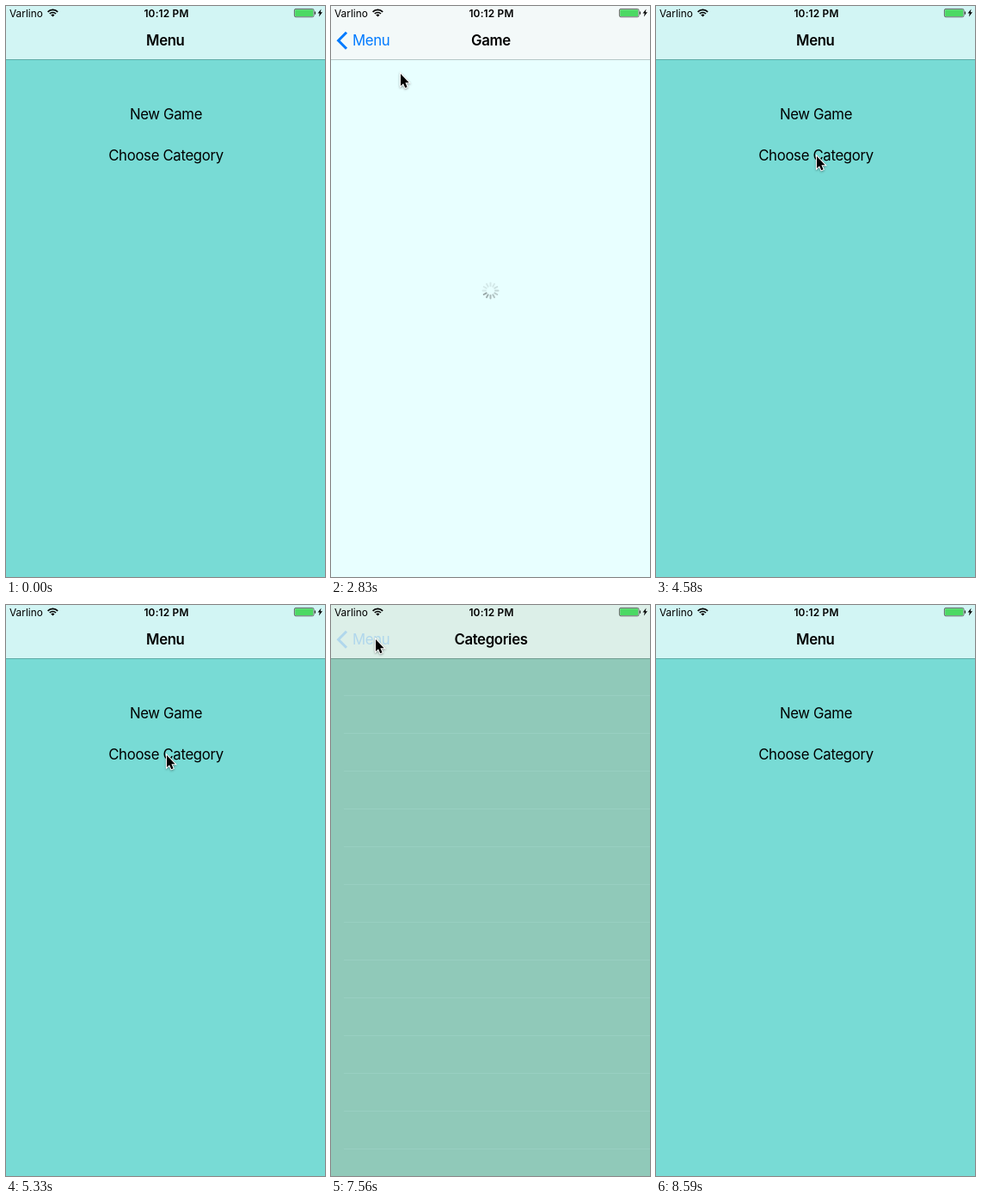
An HTML page with a canvas that plays this animation: 371 px wide and 665 px high, repeating every 9.65 s.

```html
<!DOCTYPE html>
<html lang="en">
<head>
<meta charset="utf-8">
<title>Menu navigation</title>
<style>
html, body { margin: 0; width: 100%; height: 100%; overflow: hidden; }
canvas { display: block; }
</style>
</head>
<body>
<canvas id="stage" width="371" height="665"></canvas>
<script>
const ctx = document.getElementById('stage').getContext('2d');
const W = 371, H = 665, BAR = 62, LOOP = 9650, STEP = 148.1;
const BLUE = '#007aff';

const MENU = { body: '#78dbd5', bar: '#d2f5f4' };
const GAME = { title: 'Game', body: '#e8ffff', bar: '#f3f9f9' };
const CATEGORIES = { title: 'Categories', body: '#90c9b9', bar: '#dcefe8' };

// Screen changes; "at" is the step at which the slide begins
const slides = [
  { at: 14.5, top: GAME, push: true },
  { at: 24.6, top: GAME, push: false },
  { at: 36.5, top: CATEGORIES, push: true },
  { at: 51.6, top: CATEGORIES, push: false }
];

// Pointer keys: step, x, y
const pointer = [
  [3, 228, 70], [4, 196, 96], [5, 172, 118], [6, 162, 127], [7, 166, 127],
  [16, 166, 127], [19, 81, 79], [20, 39, 48], [21, 36, 42], [25, 36, 42],
  [26, 44, 50], [30, 181, 170], [31, 187, 175], [38, 187, 175], [42, 54, 47],
  [43, 52, 40], [52, 52, 40], [53, 72, 38], [57, 350, 110]
];

const clamp = v => Math.max(0, Math.min(1, v));
const spring = s => s <= 0 ? 0 : s > 0.5 ? 1 : 1 - (1 + 18 * s) * Math.exp(-18 * s);

function text(str, x, y, { size = 16.8, weight = 400, color = '#000', align = 'left', alpha = 1, track = -0.35 } = {}) {
  ctx.globalAlpha = alpha;
  ctx.font = `${weight} ${size}px Inter, sans-serif`;
  ctx.letterSpacing = track + 'px';
  ctx.textAlign = align;
  ctx.fillStyle = color;
  ctx.fillText(str, x, y);
  ctx.globalAlpha = 1;
}

function rect(color, x, y, w, h) {
  ctx.fillStyle = color;
  ctx.fillRect(x, y, w, h);
}

function polygon(points) {
  ctx.beginPath();
  points.forEach(([x, y]) => ctx.lineTo(x, y));
  ctx.closePath();
}

function gradient(x0, x1, from, to) {
  const g = ctx.createLinearGradient(x0, 0, x1, 0);
  g.addColorStop(0, from);
  g.addColorStop(1, to);
  return g;
}

function drawMenu(x, step) {
  rect(MENU.body, x, 0, W + 120, H);
  const dim = n => step === n ? 0.2 : 1;
  text('New Game', x + 186, 132, { align: 'center', alpha: dim(13) });
  text('Choose Category', x + 186, 180, { align: 'center', alpha: dim(35) });
}

function drawSpinner(cx, cy, step) {
  const head = 8 + Math.round((step - 19) * 1.777);
  ctx.lineWidth = 2;
  ctx.lineCap = 'round';
  for (let i = 0; i < 12; i++) {
    const age = (((head - i) % 12) + 12) % 12;
    const a = (i / 12) * 2 * Math.PI;
    const sx = Math.sin(a), sy = -Math.cos(a);
    ctx.strokeStyle = `rgba(110,120,120,${0.65 - Math.min(age, 7) * 0.07})`;
    ctx.beginPath();
    ctx.moveTo(cx + sx * 5.6, cy + sy * 5.6);
    ctx.lineTo(cx + sx * 9, cy + sy * 9);
    ctx.stroke();
  }
  ctx.lineCap = 'butt';
}

function drawTop(screen, x, step) {
  rect(screen.body, x, 0, W, H);
  if (screen === CATEGORIES) {
    for (let y = 105; y < H; y += 44) rect('#98cfc1', x + 15, y, W, 1);
  } else if (step < 20) {
    drawSpinner(x + 185.5, 331.5, step);
  }
}

function drawStatus() {
  text('Varlino', 4, 12.5, { size: 11.87, track: 0 });
  text('10:12 PM', 186.5, 12.5, { size: 11.87, weight: 600, align: 'center', track: 0.2 });

  const fan = [-Math.PI * 0.75, -Math.PI * 0.25];
  ctx.strokeStyle = ctx.fillStyle = '#000';
  ctx.lineWidth = 1.7;
  for (const r of [8.2, 5.1]) {
    ctx.beginPath();
    ctx.arc(54.4, 12.6, r, ...fan);
    ctx.stroke();
  }
  ctx.beginPath();
  ctx.moveTo(54.4, 12.6);
  ctx.arc(54.4, 12.6, 3, ...fan);
  ctx.fill();

  ctx.strokeStyle = '#444';
  ctx.lineWidth = 0.8;
  ctx.beginPath();
  ctx.roundRect(335.4, 3.4, 22.6, 9.4, 1.6);
  ctx.stroke();
  rect('#4cd964', 336.2, 4.2, 21, 7.8);
  rect('#333', 358.8, 6.5, 1.3, 3.2);
  polygon([[366.6, 3.4], [362.6, 8.6], [364.8, 8.6], [363.9, 12.6], [368, 7.2], [365.7, 7.2]]);
  ctx.fillStyle = '#000';
  ctx.fill();
}

function drawBar(top, shown, time, push, step) {
  const edge = 383 - 395 * shown;
  rect(gradient(edge - 12, edge + 12, MENU.bar, top.bar), 0, 0, W, BAR);
  rect('rgba(0,0,0,.22)', 0, BAR, W, 1);

  // Labels fade by time while they travel with the slide
  const fadeIn = clamp((time - 0.15) / 0.3), fadeOut = clamp(1 - time / 0.22);
  const topAlpha = push ? fadeIn : fadeOut, menuAlpha = push ? fadeOut : fadeIn;
  const pressed = step === 24 || step === 51 ? 0.2 : 1;
  const menuX = 163 - 138 * shown;
  text('Menu', menuX, 46, { weight: 600, alpha: menuAlpha });
  text('Menu', menuX, 46, { color: BLUE, alpha: topAlpha * pressed });
  text(top.title, 186 + 228 * (1 - shown), 46, { weight: 600, align: 'center', alpha: topAlpha });

  ctx.globalAlpha = (push ? fadeIn : clamp(1 - time / 0.2)) * pressed;
  ctx.strokeStyle = BLUE;
  ctx.lineWidth = 3;
  ctx.beginPath();
  ctx.moveTo(18, 30.7);
  ctx.lineTo(8.6, 40.2);
  ctx.lineTo(18, 49.7);
  ctx.stroke();
  ctx.globalAlpha = 1;
  drawStatus();
}

function drawPointer(step) {
  if (step < pointer[0][0] || step > pointer.at(-1)[0]) return;
  const next = Math.max(1, pointer.findIndex(k => k[0] >= step));
  const [s0, x0, y0] = pointer[next - 1], [s1, x1, y1] = pointer[next];
  const u = (step - s0) / (s1 - s0);
  ctx.save();
  ctx.translate(x0 + (x1 - x0) * u, y0 + (y1 - y0) * u);
  polygon([[0, 0], [0, 14], [3.1, 11.2], [5.3, 16.3], [7.6, 15.3], [5.4, 10.3], [9.7, 10.3]]);
  ctx.shadowColor = 'rgba(0,0,0,.4)';
  ctx.shadowBlur = 2.5;
  ctx.shadowOffsetY = 1;
  ctx.strokeStyle = '#fff';
  ctx.lineWidth = 2;
  ctx.stroke();
  ctx.shadowColor = 'transparent';
  ctx.fillStyle = '#000';
  ctx.fill();
  ctx.restore();
}

function draw(now) {
  const step = Math.floor((now % LOOP + 12) / STEP);
  const slide = slides.findLast(s => s.at <= step) || { at: -9, top: CATEGORIES, push: false };
  const time = (step - slide.at) * STEP / 1000;
  const moved = spring(time);
  const shown = slide.push ? moved : 1 - moved;
  const edge = W * (1 - shown);

  drawMenu(-0.3 * W * shown, step);
  if (shown > 0) {
    rect(`rgba(0,0,0,${0.1 * shown})`, 0, 0, W, H);
    drawTop(slide.top, edge, step);
    if (shown < 1) {
      rect(gradient(edge - 7, edge, 'rgba(0,0,0,0)', 'rgba(0,0,0,.1)'), edge - 7, 0, 7, H);
    }
  }
  drawBar(slide.top, shown, time, slide.push, step);
  drawPointer(step);
}

function tick() {
  draw(performance.now());
  requestAnimationFrame(tick);
}
tick();
</script>
</body>
</html>
```
